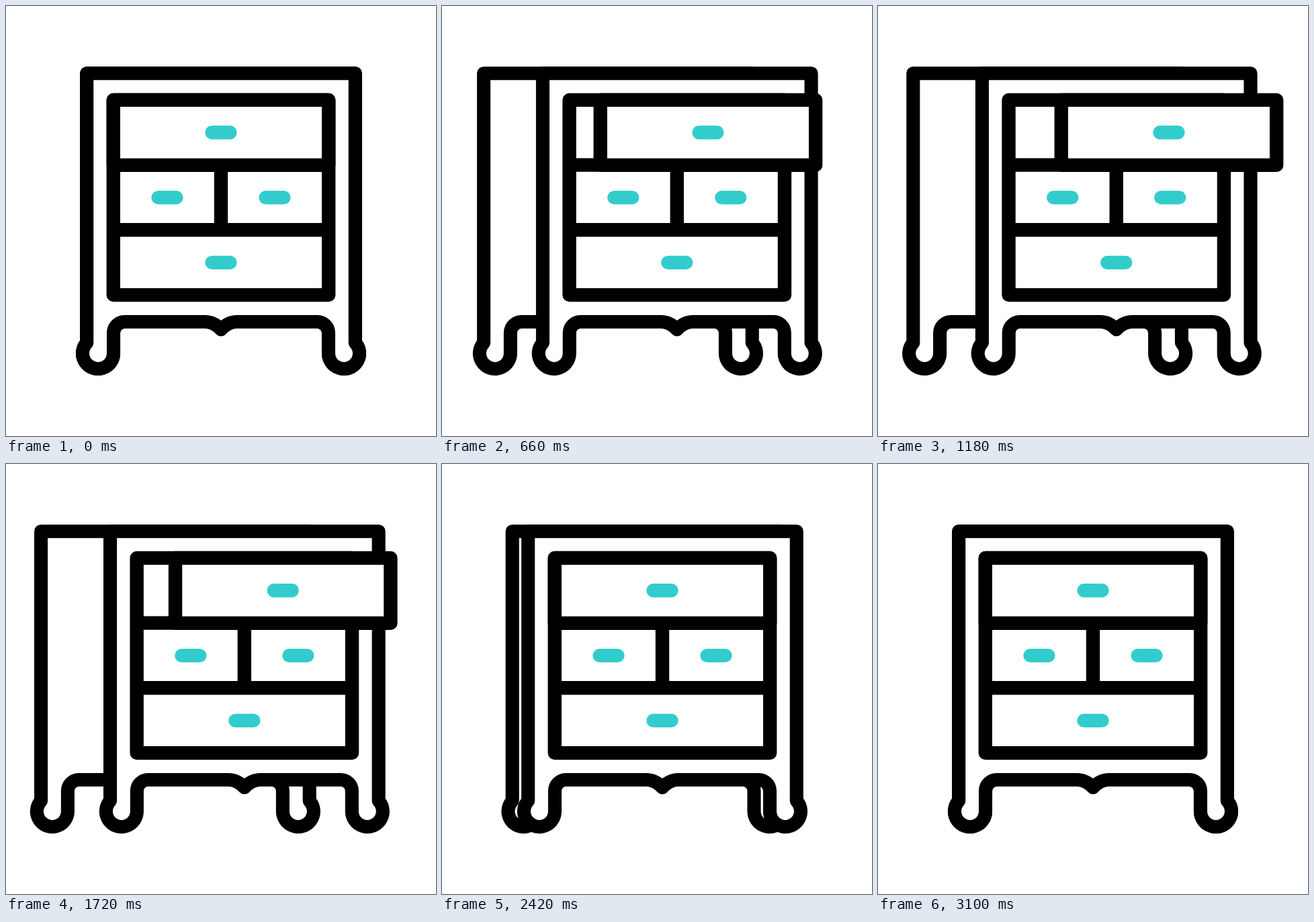
These frames come from a looping animation (640x640 px, 3.6 s). An HTML page:

```html
<!DOCTYPE html>
<html lang="en">
<head>
<meta charset="utf-8">
<title>Chest of drawers</title>
<style>
  html, body { margin: 0; width: 100%; height: 100%; overflow: hidden; background: #fff; }
  svg { display: block; width: 100%; height: 100%; }
  .line { fill: #fff; stroke: #000; stroke-width: 20.4; stroke-linejoin: round; stroke-linecap: round; }
  .outline { stroke-width: 20.1; }
  .handle { stroke: #3cc; stroke-width: 20.4; stroke-linecap: round; }
</style>
</head>
<body>
<svg viewBox="0 0 640 640">
  <path id="back" class="line outline"/>
  <g id="front">
    <path id="body" class="line outline"/>
    <path class="line" d="M159.8 139.9H480.2V430.1H159.8ZM159.8 236.6H480.2M159.8 333.3H480.2M320 236.6V333.3"/>
    <path class="handle" d="M226.5 285.1h27M386.5 285.1h27M306.5 381.9h27"/>
    <g id="drawer">
      <path class="line" d="M159.8 139.9H480.2V236.9H159.8Z"/>
      <path class="handle" d="M306.5 188.3h27"/>
    </g>
  </g>
</svg>
<script>
const LOOP = 3600, FRONT_SHIFT = 35, BACK_SHIFT = -68.4, DRAWER_SHIFT = 79;
const byId = id => document.getElementById(id);
const [back, front, body, drawer] = ['back', 'front', 'body', 'drawer'].map(byId);

const cabinet = edge =>
  'M120.2 100.2V501.3A23 23 0 1 0 160 517V486.5A16.5 16.5 0 0 1 176.5 470' + edge +
  'H463.5A16.5 16.5 0 0 1 480 486.5V517A23 23 0 1 0 519.8 501.3V100.2Z';
back.setAttribute('d', cabinet(''));
body.setAttribute('d', cabinet('H296C306 470 314 475 320 481.5C326 475 334 470 344 470'));

// Easing along a cubic Bezier with flat ends; x1 and x2 are the handle times.
function ease(x1, x2) {
  return x => {
    let low = 0, high = 1;
    for (let i = 0; i < 24; i++) {
      const s = (low + high) / 2, r = 1 - s;
      if (3 * r * r * s * x1 + 3 * r * s * s * x2 + s ** 3 < x) low = s;
      else high = s;
    }
    return low * low * (3 - 2 * low);
  };
}
const easeOpen = ease(.35, 0), easeClose = ease(.65, .16);

const progress = (t, start, duration) => Math.min(1, Math.max(0, (t - start) / duration));
const opening = (t, start, duration) => easeOpen(progress(t, start, duration));
const closing = (t, start, duration) => easeClose(progress(t, start, duration));

const shift = (node, x) => node.setAttribute('transform', `translate(${x.toFixed(2)} 0)`);

function draw(t) {
  const turn = opening(t, 0, 1380) - closing(t, 1615, 1520);
  const slide = opening(t, 390, 940) - closing(t, 1500, 600);
  shift(back, BACK_SHIFT * turn);
  shift(front, FRONT_SHIFT * turn);
  shift(drawer, DRAWER_SHIFT * slide);
}

let start;
function tick(now) {
  start ??= now;
  draw((now - start) % LOOP);
  requestAnimationFrame(tick);
}
draw(0);
requestAnimationFrame(tick);
</script>
</body>
</html>
```
